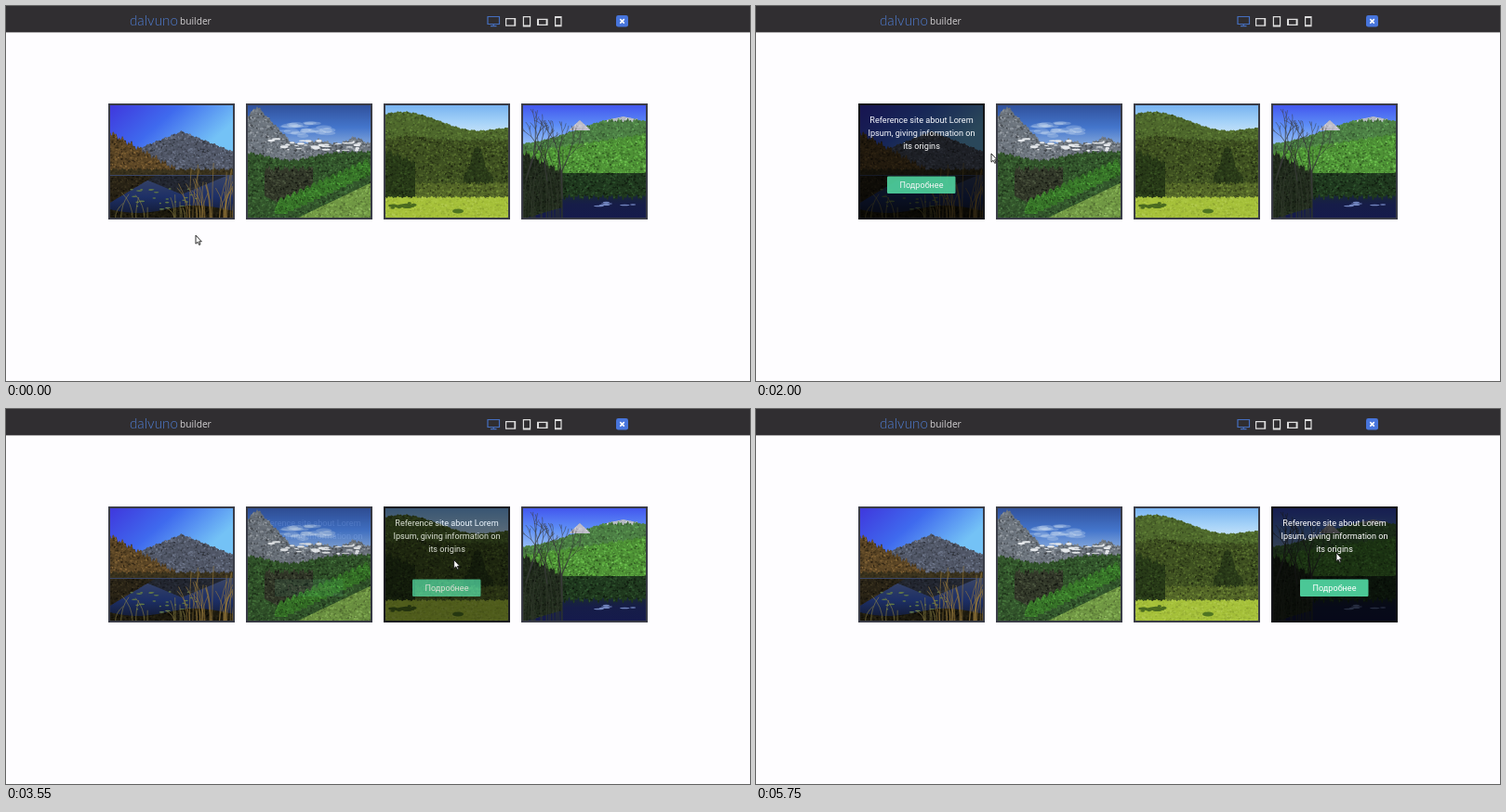
Write an HTML page with a canvas that moves like this. It is 800 px wide and 404 px high and loops after 5.8 s.

```html
<!DOCTYPE html>
<html lang="en">
<head>
<meta charset="utf-8">
<title>Hover cards</title>
<style>
html, body { margin: 0; width: 100%; height: 100%; overflow: hidden; background: #fefdff; }
canvas, svg { position: absolute; left: 0; top: 0; width: 800px; height: 404px; }
.info { font: 9.1px Roboto, sans-serif; text-anchor: middle; fill: #fff; }
.name { font: 300 15.2px Lato, sans-serif; fill: #4f7cd0; }
.sub { font: 10.2px "Open Sans", sans-serif; fill: #d2d0d2; }
</style>
</head>
<body>
<canvas id="photos" width="800" height="404"></canvas>
<svg viewBox="0 0 800 404">
  <rect width="800" height="28.4" fill="#302e31"/>
  <text class="name" x="133" y="20.5">dalvuno</text>
  <text class="sub" x="187" y="20">builder</text>
  <g fill="none" stroke="#dedede" stroke-width="1.2">
    <path d="M518 11.5h12.5v8H518zM524.2 19.5v2M521 21.7h6.5" stroke="#456fc0"/>
    <path d="M537.6 13.6h10v7.6h-10zM547 13v8.8"/>
    <path d="M556.4 11.6h7.2v10.2h-7.2zM556 21h8"/>
    <path d="M571.6 14.4h10.4v6h-10.4zM572.4 14v7M581.2 14v7"/>
    <path d="M590.6 11.6h6.4v10h-6.4zM590 12.4h7.4M590 20.8h7.4"/>
  </g>
  <rect x="656" y="10" width="13" height="12.6" rx="2.4" fill="#4775dc"/>
  <path d="M660.3 14.1l4.5 4.5m0-4.5l-4.5 4.5" stroke="#fff" stroke-width="1.6"/>
  <g id="overlays"></g>
  <path id="cursor" d="M0 0V9.2L2.1 7.3L3.7 10.4L5 9.8L3.6 6.8H6.3Z" fill="#fff" stroke="#161616" stroke-width=".9"/>
</svg>
<script>
const LOOP = 5800, STEP = 50, FADE = 850;
const TOP = 105, W = 136, H = 125;
const LEFT = [0, 1, 2, 3].map(i => 110 + i * 148);
// time, x, y
const PATH = [
  [0, 204, 247], [300, 204, 247], [1200, 199, 165], [1700, 205, 161], [2000, 253, 159], [2800, 345, 170],
  [3050, 432, 170], [4100, 539, 154], [4550, 683, 148], [5000, 626, 146], [5300, 624, 155], [LOOP, 624, 155]
];

const ctx = document.getElementById("photos").getContext("2d");
let seed = 7;
const rand = () => (seed = seed * 16807 % 2147483647) / 2147483647;
const between = (a, b) => a + rand() * (b - a);
const bump = (x, center, width, height) => height * Math.exp(-(((x - center) / width) ** 2));
const tent = (x, center, width, height) => height * Math.max(0, 1 - Math.abs(x - center) / width);
const rough = x => Math.sin(x * .7) + Math.sin(x * 1.9 + 1);
const hsl = (h, s, l) => `hsl(${h} ${s}% ${l}%)`;

function fade(y0, y1, slant, ...colors) {
  const g = ctx.createLinearGradient(0, y0, slant, y1);
  colors.forEach((c, i) => g.addColorStop(i / (colors.length - 1), c));
  ctx.fillStyle = g;
  ctx.fillRect(0, y0, W, y1 - y0);
}

function blob(x, y, rx, ry, color) {
  ctx.fillStyle = color;
  ctx.beginPath();
  ctx.ellipse(x, y, rx, ry, 0, 0, 7);
  ctx.fill();
}

// Land between two curves, mottled with lighter and darker dabs
function land(top, bottom, [h, s, l], spread = l * .6, x0 = 0, x1 = W) {
  ctx.save();
  ctx.beginPath();
  for (let x = x0; x <= x1; x++) ctx.lineTo(x, top(x));
  for (let x = x1; x >= x0; x--) ctx.lineTo(x, bottom(x));
  ctx.fillStyle = hsl(h, s, l);
  ctx.fill();
  ctx.clip();
  for (let x = x0; x < x1; x += .5)
    for (let y = top(x) + rand() * 8; y < bottom(x); y += 8)
      blob(x, y, between(.5, 1.5), between(.4, 1.3), hsl(h, s, l + (rand() - .5) * spread));
  ctx.restore();
}

function stalks(count, x, y, spread, height, lean, color) {
  ctx.strokeStyle = color;
  ctx.lineWidth = .6;
  for (let i = 0; i < count; i++) {
    const sx = between(x, x + spread), h = height * between(.4, 1);
    ctx.beginPath();
    ctx.moveTo(sx, y);
    ctx.quadraticCurveTo(sx, y - h * .6, sx + (rand() - .5) * lean, y - h);
    ctx.stroke();
  }
}

function branch(x, y, length, angle) {
  if (length < 4) return;
  const ex = x + Math.cos(angle) * length, ey = y + Math.sin(angle) * length;
  ctx.lineWidth = Math.max(.5, length / 17);
  ctx.beginPath();
  ctx.moveTo(x, y);
  ctx.lineTo(ex, ey);
  ctx.stroke();
  branch(ex, ey, length * .73, angle - between(.1, .35));
  branch(ex, ey, length * .62, angle + between(.15, .5));
}

const level = y => () => y;
const floor = level(H);

function autumnLake() {
  fade(0, 78, 70, "#3f35dc", "#3f6aee", "#74c2f6");
  land(x => 62 - tent(x, 79, 80, 32) + rough(x) * .6, level(77), [222, 12, 36], 30);
  land(x => 30 + x * .56 + rough(x) * 2, level(77), [36, 42, 25], 26, 0, 80);
  land(x => 71 + rough(x), level(78), [44, 32, 17]);
  fade(77, H, 0, "#3a4666", "#1d2f66", "#101627");
  land(level(78), x => 78 + tent(x, 79, 48, 20), [225, 16, 16], 12, 31, 127);
  land(level(78), x => 108 - x * .6, [42, 30, 12], 14, 0, 50);
  for (let i = 0; i < 28; i++) blob(between(25, 95), between(90, 114), between(1, 3.5), .8, "#5f7648");
  land(x => 114 + Math.sin(x / 20) * 4, floor, [48, 35, 8], 12);
  stalks(30, 84, H, 52, 62, 28, "#98793c");
  stalks(12, 4, H, 80, 30, 26, "#8d8345");
}

function alpineValley() {
  fade(0, 52, 0, "#2f4e98", "#4476cc", "#9ab8e0");
  for (let i = 0; i < 24; i++) blob(between(38, 92), between(20, 35), between(4, 11), between(1, 3), "#d6e4f444");
  land(x => Math.min(3 + Math.abs(x - 12) * 1.05, 43 - tent(x, 78, 14, 4) - tent(x, 117, 15, 7)) + rough(x),
    level(66), [212, 7, 46], 40);
  for (let i = 0; i < 32; i++) {
    const x = between(24, 125);
    blob(x, between(40, 52) - tent(x, 24, 20, 6), between(1, 5), between(.5, 1.5), "#e6e9ec");
  }
  land(x => 52 + bump(x, 48, 32, 9) + rough(x), floor, [110, 32, 25], 24);
  land(x => 70 + rough(x) * 2, x => 112 - Math.abs(x - 45) * .5, [85, 15, 19], 24, 20, 72);
  land(x => 126 - (x - 50) * .48, floor, [88, 38, 43], 24, 50);
  for (let i = 0; i < 14; i++) {
    const x = 38 + i * 7;
    land(t => 115 - i * 3.2 - bump(t, x, 5, 14), level(119 - i * 3.2), [108, 48, 31], 26, x - 7, Math.min(W, x + 7));
  }
}

function meadow() {
  fade(0, 40, 0, "#73b0f0", "#a5d2f8", "#dceefa");
  land(x => 35 - bump(x, 20, 58, 26) - bump(x, W, 30, 8) + rough(x) * .5, level(66), [86, 40, 29], 18);
  land(x => 40 - bump(x, 30, 25, 5) + rough(x), level(108), [82, 42, 22], 22);
  land(x => 50 + x * .4 + rough(x) * 2, level(107), [92, 42, 16], 14, 0, 34);
  land(x => 80 - bump(x, 101, 9, 34) + rough(x), level(100), [90, 40, 16], 14, 86, 118);
  land(x => 86 + rough(x), level(104), [78, 44, 28], 24, 34);
  land(x => 101 + rough(x) * .7, floor, [72, 54, 49], 14);
  for (let i = 0; i < 12; i++) blob(between(8, 36), between(105, 113), between(2, 5), 1.5, "#4a6a20");
  blob(80, 116, 6, 2.5, "#4f7422");
}

function mirrorLake() {
  fade(0, 48, 0, "#4052ee", "#5e8ff6", "#a3c8f6");
  land(x => 46 - bump(x, 110, 70, 30) + rough(x) * .5, level(76), [112, 30, 38], 24);
  land(x => 29 - tent(x, 63, 12, 11), level(29), [250, 10, 76], 16, 52, 74);
  land(x => 18 - tent(x, 110, 18, 4), x => 18 + rough(x) * 1.3, [220, 10, 75], 20, 92, 125);
  land(x => 53 - x * .15 + rough(x), level(77), [104, 46, 39], 34);
  fade(75, H, 0, "#2c4a28", "#1b2d2c", "#161d48", "#151a4c");
  land(level(75), x => 101 + rough(x) * 2, [118, 30, 17], 20, 30);
  land(x => 52 + x * .5 + rough(x) * 2, x => H - x * .3, [105, 22, 13], 14, 0, 44);
  for (let i = 0; i < 8; i++) blob(between(76, 122), between(106, 111), between(2, 8), .8, "#7386c0");
  ctx.strokeStyle = "#3a3b3c";
  branch(44, 103, 29, -1.6);
  branch(28, 84, 23, -1.72);
  branch(5, 82, 25, -1.25);
  stalks(30, 0, H, 45, 85, 28, "#30382b");
}

[autumnLake, alpineValley, meadow, mirrorLake].forEach((paint, i) => {
  ctx.save();
  ctx.translate(LEFT[i], TOP);
  ctx.beginPath();
  ctx.rect(0, 0, W, H);
  ctx.clip();
  paint();
  ctx.strokeStyle = "#3b3d48";
  ctx.lineWidth = 4;
  ctx.strokeRect(0, 0, W, H);
  ctx.restore();
});

const layer = document.getElementById("overlays");
layer.innerHTML = LEFT.map(x => `<g class="info" transform="translate(${x} ${TOP})">
  <rect width="${W}" height="${H}" fill="#000" fill-opacity=".66"/>
  <text x="68" y="21">Reference site about Lorem</text>
  <text x="68" y="35">Ipsum, giving information on</text>
  <text x="68" y="49">its origins</text>
  <rect x="31" y="78.5" width="73.5" height="18.5" rx="1.2" fill="#4bc796"/>
  <text x="68" y="91.3">Подробнее</text></g>`).join("");
const overlays = [...layer.children];
const cursor = document.getElementById("cursor");

const smooth = p => p * p * (3 - 2 * p);

function pointer(t) {
  const k = PATH.findIndex(p => p[0] > t);
  const [t0, x0, y0] = PATH[k - 1], [t1, x1, y1] = PATH[k];
  const p = smooth((t - t0) / (t1 - t0));
  return [x0 + (x1 - x0) * p, y0 + (y1 - y0) * p];
}

// Each overlay fades in while the pointer is over its card, and out afterwards
function hoverLevel(left, t) {
  let amount = 0;
  for (let s = 0; s <= t; s += STEP) {
    const [x, y] = pointer(s);
    const inside = x >= left && x < left + W && y >= TOP && y < TOP + H;
    amount = Math.min(1, Math.max(0, amount + (inside ? STEP : -STEP) / FADE));
  }
  return smooth(amount);
}

function draw(now) {
  const t = Math.floor(now % LOOP / STEP) * STEP;
  overlays.forEach((el, i) => el.setAttribute("opacity", hoverLevel(LEFT[i], t)));
  cursor.setAttribute("transform", `translate(${pointer(t)})`);
}

const start = performance.now();
function tick() {
  draw(performance.now() - start);
  requestAnimationFrame(tick);
}
tick();
</script>
</body>
</html>
```
